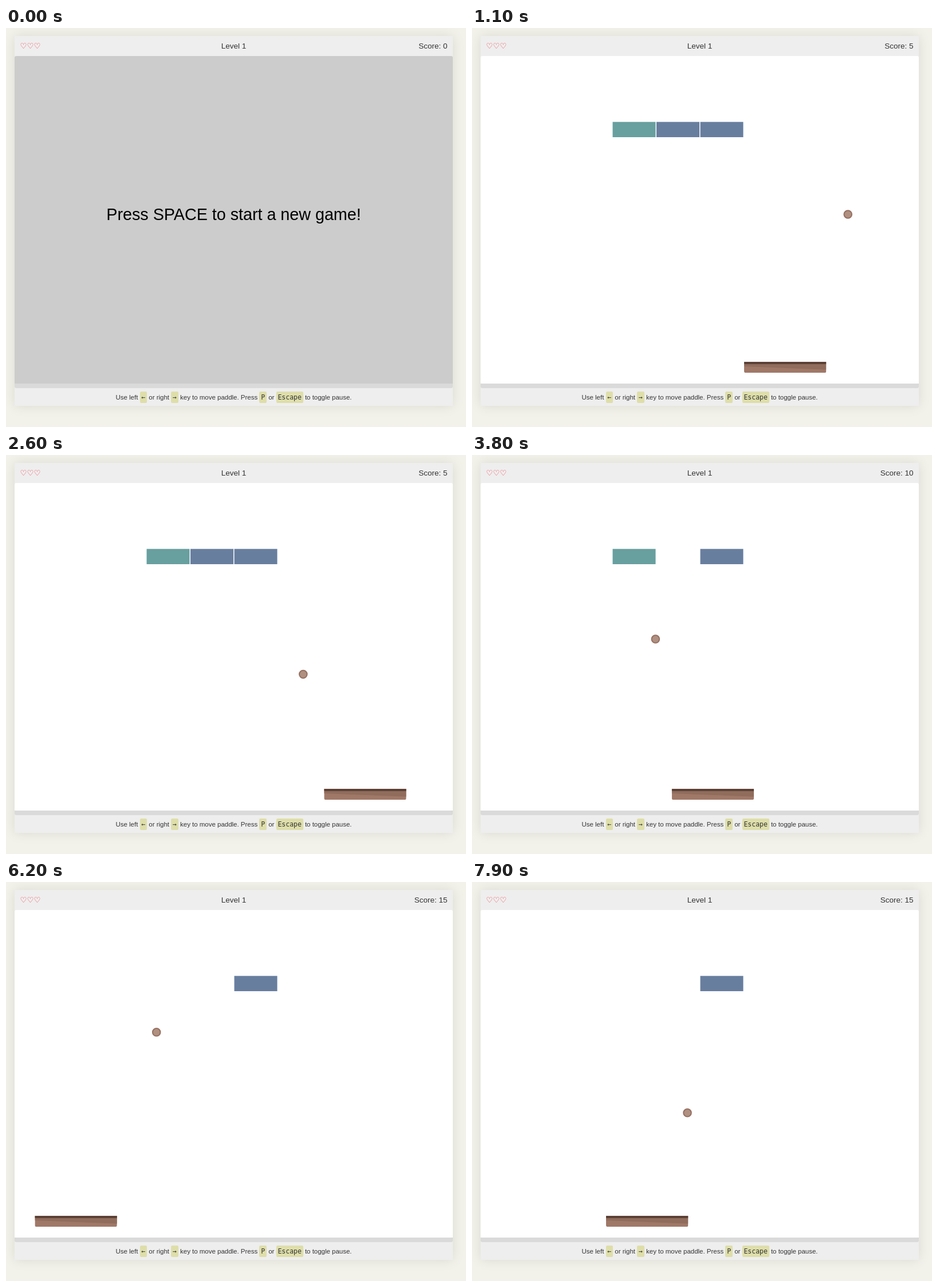
Animation, 803 px wide and 698 px high, one loop 8000 ms. Source, as an HTML page with a canvas:

```html
<!DOCTYPE html>
<html lang="en">
<head>
<meta charset="utf-8">
<title>Brick game</title>
<style>
  html, body { margin: 0; width: 100%; height: 100%; overflow: hidden; background: #f2f2ea; }
  body { position: relative; font-family: "Liberation Sans", "DejaVu Sans", sans-serif; color: #333; }
  .card { position: absolute; left: 15px; top: 14px; width: 765px; height: 647px;
    background: #eee; box-shadow: 0 0 20px rgba(0, 0, 0, .1); }
  canvas { position: absolute; left: 0; top: 0; }
  .bar span, .help { position: absolute; white-space: nowrap; }
  .bar span { top: 14px; font-size: 13.5px; line-height: 35px; }
  .bar .lives { left: 24.5px; font-size: 13.39px; color: #f03340; }
  .level { left: 15px; width: 765px; text-align: center; }
  .score { right: calc(100% - 770.5px); }
  .help { left: 15px; top: 630px; width: 765px; text-align: center;
    font-size: 11.475px; line-height: 32px; }
  kbd { font: 11.475px "DejaVu Sans Mono", monospace; padding: .25em;
    border-radius: 2px; background: #dedeaa; }
</style>
</head>
<body>
<div class="card"></div>
<canvas id="stage" width="803" height="698"></canvas>
<div class="bar">
  <span class="lives">♡♡♡</span>
  <span class="level">Level 1</span>
  <span class="score" id="score">Score: 0</span>
</div>
<div class="help">Use left <kbd>←</kbd> or right <kbd>→</kbd> key to move paddle. Press <kbd>P</kbd> or <kbd>Escape</kbd> to toggle pause.</div>
<script>
const LOOP = 8000, TICK = 100, START = 300;
const field = { x: 15, y: 49, w: 765, h: 573, rim: 8 };
const ctx = document.getElementById('stage').getContext('2d');
const scoreEl = document.getElementById('score');

// The ball bounces between brick row and paddle; each paddle hit sets a new slant.
const TOP = 199, BOTTOM = 576.3, WALL = 772.3, SPAN = BOTTOM - TOP;
const origin = { x: 397.5, y: 336 };
const RISE = origin.y - TOP;
const slants = [.98, -.645, .241, .219];

// time and vertical distance covered: the game runs at an uneven pace
const pace = [
  [200, 0], [1100, 264], [2400, 639], [2500, 639], [2600, 707],
  [3400, 903], [4600, 1238], [6200, 1710], [7900, 2196]
];

// time a key goes down and signed number of paddle steps
const STEP = 11.475, STEP_MS = 25, HOME = 325.8;
const keys = [[775, 27], [2050, -7], [3000, -6], [3500, -37], [4650, -1], [6350, 16]];

const TEAL = '#689f9f', BLUE = '#687e9f';
const bricks = [TEAL, BLUE, BLUE, TEAL];
const hitOrder = [3, 1, 0];

const clamp = (v, lo, hi) => Math.min(hi, Math.max(lo, v));

function distance(t) {
  const i = Math.max(1, pace.findIndex(p => t <= p[0]));
  const [t0, d0] = pace[i - 1], [t1, d1] = pace[i];
  return d0 + (d1 - d0) * clamp((t - t0) / (t1 - t0), 0, 1);
}

function ballAt(d) {
  const y = TOP + SPAN - Math.abs((d - RISE + 2 * SPAN) % (2 * SPAN) - SPAN);
  let x = origin.x;
  slants.forEach((s, i) => {
    const end = RISE + SPAN * (2 * i + 1);
    const begin = i ? end - 2 * SPAN : 0;
    x += s * (clamp(d, begin, end) - begin);
    if (x > WALL) x = 2 * WALL - x;
  });
  return [x, y];
}

function paddleAt(t) {
  const steps = keys.reduce((sum, [down, n]) =>
    sum + Math.sign(n) * clamp((t - down) / STEP_MS, 0, Math.abs(n)), 0);
  return HOME + steps * STEP;
}

function hitsAt(d) {
  return Math.max(0, Math.floor((d - RISE) / (2 * SPAN)) + 1);
}

function rounded(x, y, w, h, r) {
  ctx.beginPath();
  ctx.roundRect(x, y, w, h, r);
}

function drawField(color) {
  const { x, y, w, h, rim } = field;
  ctx.save();
  rounded(x, y, w, h + rim, 3);
  ctx.clip();
  ctx.fillStyle = color;
  ctx.fillRect(x, y, w, h);
  ctx.fillStyle = '#dadada';
  ctx.fillRect(x, y + h, w, rim);
  ctx.restore();
}

function drawIntro() {
  ctx.fillStyle = '#000';
  ctx.font = '28.69px "Liberation Sans", sans-serif';
  ctx.textAlign = 'center';
  ctx.fillText('Press SPACE to start a new game!', 397.5, 336);
}

function drawBricks(hits) {
  const gone = hitOrder.slice(0, hits);
  bricks.forEach((color, i) => {
    if (gone.includes(i)) return;
    ctx.fillStyle = color;
    ctx.fillRect(245.5 + i * 76.5, 164.3, 75, 26.7);
  });
}

function drawPaddle(x) {
  const y = 584, w = 143.4, h = 19.2;
  ctx.save();
  rounded(x, y, w, h, [0, 0, 3, 3]);
  ctx.clip();
  ctx.fillStyle = '#a07868';
  ctx.fillRect(x, y, w, h);
  ctx.fillStyle = '#906c5c';
  ctx.beginPath();
  ctx.moveTo(x, y);
  ctx.lineTo(x + w, y);
  ctx.lineTo(x + w, y + 13.7);
  ctx.lineTo(x, y + 8);
  ctx.fill();
  ctx.fillStyle = '#5c4034';
  ctx.fillRect(x, y, w, 4);
  ctx.restore();
}

function drawBall([x, y]) {
  ctx.beginPath();
  ctx.arc(x, y, 6.8, 0, Math.PI * 2);
  ctx.fillStyle = '#b09080';
  ctx.fill();
  ctx.lineWidth = 2;
  ctx.strokeStyle = '#967062';
  ctx.stroke();
}

function render(t) {
  const playing = t >= START;
  const d = distance(t), hits = hitsAt(d);
  ctx.clearRect(0, 0, 803, 698);
  drawField(playing ? '#fff' : '#ccc');
  if (playing) {
    drawBricks(hits);
    drawPaddle(paddleAt(t));
    drawBall(ballAt(d));
  } else {
    drawIntro();
  }
  scoreEl.textContent = 'Score: ' + 5 * hits;
}

const began = performance.now();
function frame() {
  const t = (performance.now() - began) % LOOP;
  render(Math.floor(t / TICK) * TICK);
  requestAnimationFrame(frame);
}
frame();
</script>
</body>
</html>
```
